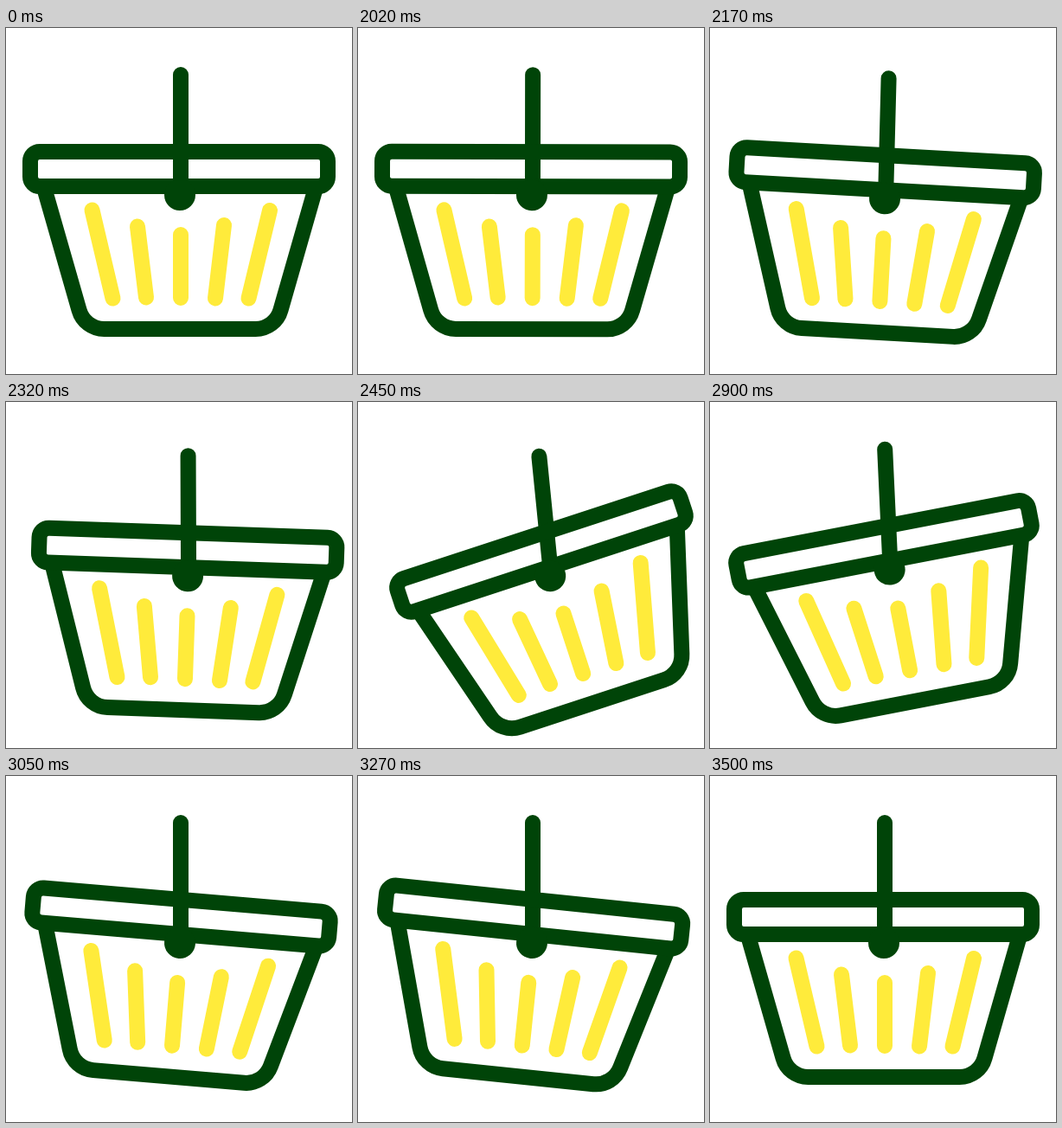
Animation of 400 by 400 pixels, one loop 3.52 s. Source, as an HTML page:

```html
<!DOCTYPE html>
<html lang="en">
<head>
<meta charset="utf-8">
<title>Swinging basket</title>
<style>
  html, body { margin: 0; width: 100%; height: 100%; overflow: hidden; background: #fff; }
  svg { display: block; width: 100%; height: 100%; }
  g { fill: none; stroke-width: 18; stroke-linecap: round; }
  .green { stroke: #004408; }
  .yellow { stroke: #ffeb3b; }
</style>
</head>
<body>
<svg viewBox="0 0 400 400">
  <g id="swing" class="green">
    <path d="M202 54V193"/>
    <g id="basket">
      <path d="M45 188L84.5 326A30 30 0 0 0 113.5 348H288.5A30 30 0 0 0 317.5 326L357 188"/>
      <rect x="28" y="143" width="344" height="40" rx="11"/>
      <circle cx="201" cy="193" r="9"/>
      <path class="yellow" d="M99.5 210.5L123.5 312.5M152 229.5L162 311.5M202 239V312M252 228L242 312.5M305 211L280.5 312.5"/>
    </g>
  </g>
</svg>
<script>
const LOOP = 3520;

// Each track lists [time in ms, value].
const handX = track([[2000, 0], [2160, 4.3], [2345, 8.7], [2450, 7.4], [2750, 1], [3000, 0]]);
const handY = track([[2000, 0], [2160, 4], [2320, 8.2], [2410, 9], [2450, 8.8], [2750, 3], [3000, 0]]);
const handleTilt = track([[2000, 0], [2150, 1.5], [2320, -0.2], [2450, -5.7], [2590, -7.4], [2750, -6.2], [3050, 0]]);
const basketTilt = track([[2000, 0], [2170, 3.2], [2320, 2], [2450, -18], [2520, -25.5], [2630, -32],
  [2750, -26.7], [3050, 4.75], [3135, 8.6], [3500, 0]]);

// Smooth interpolation that never overshoots its keys.
function track(keys) {
  const last = keys.length - 1;
  const rise = i => (keys[i + 1][1] - keys[i][1]) / (keys[i + 1][0] - keys[i][0]);
  const slopes = keys.map((_, i) => {
    if (i === 0 || i === last) return 0;
    const a = rise(i - 1), b = rise(i);
    return a * b > 0 ? 2 * a * b / (a + b) : 0;
  });
  return t => {
    if (t <= keys[0][0]) return keys[0][1];
    if (t >= keys[last][0]) return keys[last][1];
    const i = keys.findIndex(k => k[0] > t) - 1;
    const [t0, v0] = keys[i], [t1, v1] = keys[i + 1];
    const span = t1 - t0, u = (t - t0) / span, w = 1 - u;
    return v0 * w * w * (1 + 2 * u) + v1 * u * u * (3 - 2 * u)
      + span * u * w * (slopes[i] * w - slopes[i + 1] * u);
  };
}

const swing = document.getElementById('swing');
const basket = document.getElementById('basket');
const start = performance.now();

function draw() {
  const t = (performance.now() - start) % LOOP;
  const tilt = handleTilt(t);
  swing.setAttribute('transform', `translate(${handX(t)} ${handY(t)}) rotate(${tilt} 202 54)`);
  basket.setAttribute('transform', `rotate(${basketTilt(t) - tilt} 201 193)`);
  requestAnimationFrame(draw);
}
draw();
</script>
</body>
</html>
```
